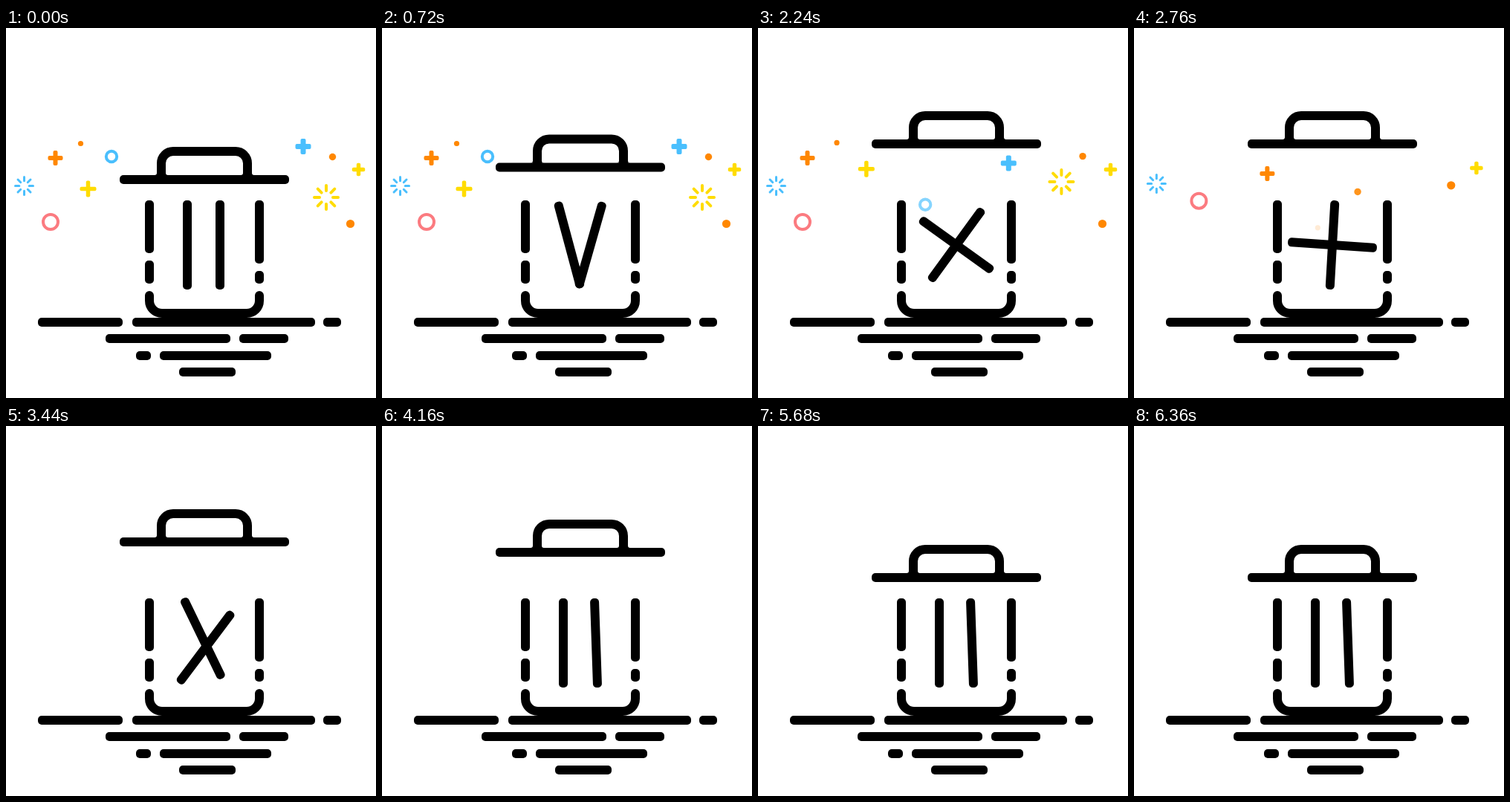
Recreate the animation shown at these times as an HTML page. Size 498 px wide and 498 px high, loop 7.2 s.

```html
<!DOCTYPE html>
<html lang="en">
<head>
<meta charset="utf-8">
<title>Trash can</title>
<style>
  html, body { margin: 0; width: 100%; height: 100%; overflow: hidden; background: #fff; }
  svg { display: block; width: 100%; height: 100%; }
</style>
</head>
<body>
<svg id="stage" viewBox="0 0 498 498">
  <g id="ground"></g>
  <g id="can">
    <g id="body">
      <path d="M193 360V367a17 17 0 0 0 17 17H324a17 17 0 0 0 17-17V360" fill="none" stroke="#000" stroke-width="12" stroke-linecap="round"/>
    </g>
    <g id="lid">
      <path d="M209 204V182a16 16 0 0 1 16-16H309a16 16 0 0 1 16 16V204" fill="none" stroke="#000" stroke-width="12"/>
      <path d="M200 198Q203 198 203 195H215Q215 198 218 198ZM316 198Q319 198 319 195H331Q331 198 334 198Z"/>
    </g>
  </g>
  <g id="sparks"></g>
</svg>
<script>
const LOOP = 7200, STEP = 40;
const $ = id => document.getElementById(id);

function add(parent, tag, attrs) {
  const el = document.createElementNS('http://www.w3.org/2000/svg', tag);
  for (const k in attrs) el.setAttribute(k, attrs[k]);
  return parent.appendChild(el);
}
const bar = (parent, x, y, width, height) => add(parent, 'rect', { x, y, width, height, rx: 5 });

[[43, 390, 114], [170, 390, 246], [427, 390, 24], [134, 412, 168], [314, 412, 66],
 [175, 435, 20], [207, 435, 150], [233, 457, 76]].forEach(([x, y, w]) => bar($('ground'), x, y, w, 12));
[[187, 232, 71], [187, 313, 31], [335, 232, 85], [335, 327, 17]]
  .forEach(([x, y, h]) => bar($('body'), x, y, 12, h));
bar($('lid'), 153, 198, 228, 12);
const sticks = [0, 1].map(() => bar($('can'), -6, -60, 12, 120));

const BLUE = '#4abffd', ORANGE = '#ff8700', YELLOW = '#ffdc00', PINK = '#fb7b80';
const shapes = {
  dot: (g, r, w, fill) => add(g, 'circle', { r, fill }),
  ring: (g, r, w, stroke) => add(g, 'circle', { r, fill: 'none', stroke, 'stroke-width': w }),
  plus(g, r, w, fill) {
    add(g, 'rect', { x: -r, y: -w / 2, width: 2 * r, height: w, rx: 2, fill });
    add(g, 'rect', { x: -w / 2, y: -r, width: w, height: 2 * r, rx: 2, fill });
  },
  burst(g, r, w, stroke) {
    for (let a = 0; a < 360; a += 45)
      add(g, 'path', { d: `M${r * 0.5} 0H${r - w / 2}`, stroke, 'stroke-width': w,
        'stroke-linecap': 'round', transform: `rotate(${a})` });
  }
};

// shape, x, y, radius, line width, colour, start time, control point
const sparks = [
  ['ring', 142, 173, 7.2, 4, BLUE, 1620],
  ['plus', 400, 159.5, 10.5, 7, BLUE, 1740],
  ['plus', 110.5, 216.5, 11, 5.5, YELLOW, 1860],
  ['burst', 431, 228, 18, 4, YELLOW, 1980],
  ['dot', 100.5, 155.5, 3.6, 0, ORANGE, 2094],
  ['dot', 439.5, 173.5, 4.7, 0, ORANGE, 2160, 350, 140],
  ['plus', 66.5, 175, 10, 6, ORANGE, 2233],
  ['dot', 463.5, 263.5, 5.6, 0, ORANGE, 2441, 385, 112],
  ['ring', 60, 261, 10, 4, PINK, 2508],
  ['plus', 474.5, 190.5, 8.7, 5.4, YELLOW, 2594, 360, 170],
  ['burst', 24.5, 212.5, 13.5, 3, BLUE, 2660]
].map(([shape, x, y, r, w, color, start, cx, cy]) => {
  const g = add($('sparks'), 'g', {}), left = x < 267;
  shapes[shape](g, r, w, color);
  return { g, x, y, start, cx: cx || (left ? 160 : 355), cy: cy || 140,
    ex: left ? 255 : 262, ey: left ? 280 : 270 };
});

const span = (t, a, b) => Math.min(1, Math.max(0, (t - a) / (b - a)));
const smooth = p => (1 - Math.cos(Math.PI * p)) / 2;
const cubic = p => p < 0.5 ? 4 * p ** 3 : 1 - 4 * (1 - p) ** 3;
const bezier = (a, b, c, p) => (1 - p) ** 2 * a + 2 * p * (1 - p) * b + p * p * c;

function place(i, x, y, angle) {
  sticks[i].setAttribute('transform', `translate(${x} ${y}) rotate(${angle})`);
}

function drawSticks(t) {
  if (t < 3120) {
    const u = smooth(span(t, 400, 1200)), spin = 360 * cubic(span(t, 1600, 3280));
    place(0, 244 + 23 * u, 292, -43.5 * u + spin);
    place(1, 288 - 21 * u, 292, 46 * u + spin);
    return;
  }
  // uncross while the pair swirls apart
  const u = smooth(span(t, 3120, 4000)), spin = 360 * cubic(span(t, 1600, 3280));
  const dir = (1 - u) * 1.8, dx = 22 * u * Math.cos(dir), dy = 22 * u * Math.sin(dir);
  const mean = 1.25 - 2.25 * u + 24 * u * (1 - u) + spin, half = 44.75 - 45.75 * u;
  place(0, 267 - dx - u, 292 - dy, mean - half);
  place(1, 267 + dx - u, 292 + dy, mean + half);
}

function draw(t) {
  const lift = 48 * (smooth(span(t, 400, 1200)) - span(t, 3880, 4400) ** 2);
  $('lid').setAttribute('transform', `translate(0 ${-lift})`);
  drawSticks(t);

  const squeeze = 1 - 0.17 * Math.sin(Math.PI * span(t, 4800, 5680)) ** 2;
  const rock = -15 * Math.sin(2 * Math.PI * span(t, 5800, 6360));
  $('can').setAttribute('transform',
    `rotate(${rock} ${267 + 2 * rock} 390) translate(206 0) scale(${squeeze} 1) translate(-206 0)`);

  for (const s of sparks) {
    const p = span(t, s.start, s.start + 680) ** 2;
    s.g.setAttribute('transform', `translate(${bezier(s.x, s.cx, s.ex, p)} ${bezier(s.y, s.cy, s.ey, p)})`);
    s.g.setAttribute('opacity', Math.min(1, (1 - p) * 4));
  }
}

const begin = performance.now();
function tick() {
  const t = (performance.now() - begin) % LOOP;
  draw(Math.floor(t / STEP) * STEP);
  requestAnimationFrame(tick);
}
tick();
</script>
</body>
</html>
```
